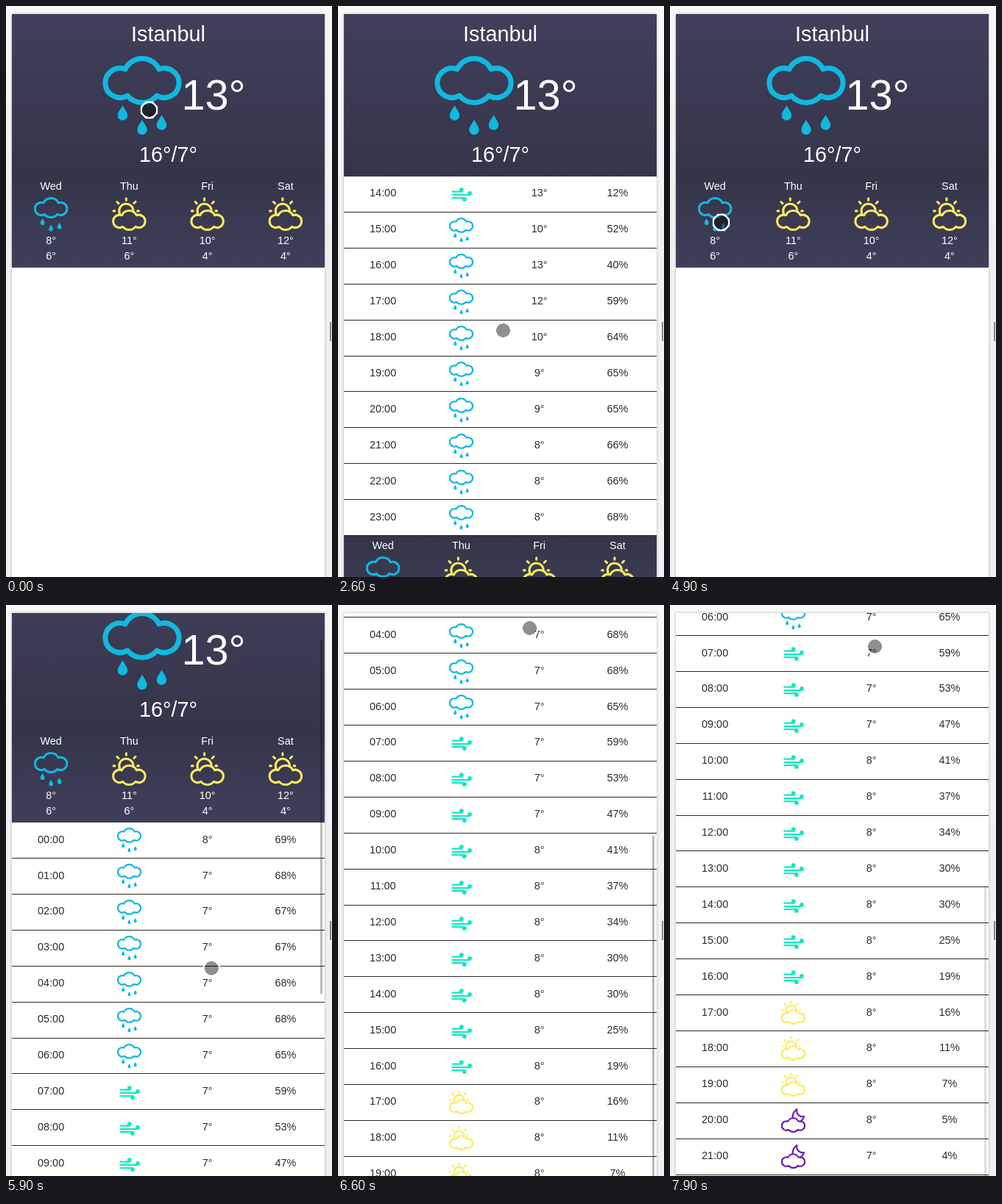
These frames come from a looping animation (443 by 777 pixels, 8 s). An HTML page with a canvas:

```html
<!DOCTYPE html>
<html lang="en">
<head>
<meta charset="utf-8">
<title>Weather forecast</title>
<style>
html, body { margin: 0; width: 443px; height: 777px; overflow: hidden; background: #f2f2f2; }
canvas { display: block; }
</style>
</head>
<body>
<canvas id="stage" width="443" height="777"></canvas>
<script>
const ctx = document.getElementById('stage').getContext('2d');
const LOOP = 8000, TICK = 100;
const LEFT = 8, TOP = 11, WIDTH = 425, HEADER = 232, DAYS = 124, ROW = 48.9;
const CENTER = LEFT + WIDTH / 2;
const column = i => LEFT + WIDTH * (i + 0.5) / 4;

// Icons live in a 106 unit square.
const ICON = 106;
const CLOUD = 'M30 18A25.5 25.5 0 0 1 76 18A20 20 0 1 1 73 54A25.8 25.8 0 0 1 33 54A20 20 0 1 1 30 18Z';
const path = d => new Path2D(d);
const lowCloud = new Path2D();
lowCloud.addPath(path(CLOUD), new DOMMatrix().translate(0, 39));
const drop = (x, y) => `M${x} ${y}c2 5 6.7 9 6.7 14a6.7 6.7 0 0 1 -13.4 0c0 -5 4.7 -9 6.7 -14Z`;
const ball = (x, y) => `M${x - 9.5} ${y}a9.5 9.5 0 1 0 19 0a9.5 9.5 0 1 0 -19 0Z`;

const icons = {
  rain: {
    color: '#10b9e0', lines: [path(CLOUD)],
    solid: path(drop(26.5, 67) + drop(53, 86.5) + drop(79.5, 80))
  },
  sun: {
    color: '#fbea60',
    lines: [lowCloud, path('M23.5 52A22 22 0 1 1 65.5 46M43.8 4V10M4 43.5H8M79 43.5H83M15 15L20 20M73 14.5L68 19.5')]
  },
  wind: {
    color: '#17e8c2', lines: [path('M14 44H56M14 58H90M14 71H68')],
    solid: path(ball(54, 36) + ball(90, 51) + ball(67, 77))
  },
  night: {
    color: '#6b20b8',
    lines: [lowCloud, path('M50 41C50 22 58 10 69 4C65 24 78 38 100 36C97 46 92 52 85 57')]
  }
};

// Forecast content: one entry of rain chance per hour.
const forecast = (first, chances, sky, temp) => chances.map((chance, i) => {
  const h = first + i;
  return { icon: sky(h), cells: [String(h).padStart(2, '0') + ':00', '', temp(h) + '°', chance + '%'] };
});
const today = forecast(14, [12, 52, 40, 59, 64, 65, 65, 66, 66, 68],
  h => h === 14 ? 'wind' : 'rain',
  h => [13, 10, 13, 12, 10][h - 14] || (h < 21 ? 9 : 8));
const wednesday = forecast(0,
  [69, 68, 67, 67, 68, 68, 65, 59, 53, 47, 41, 37, 34, 30, 30, 25, 19, 16, 11, 7, 5, 4, 3, 3],
  h => h < 7 ? 'rain' : h < 17 ? 'wind' : h < 20 ? 'sun' : 'night',
  h => h === 0 || (h > 9 && h < 21) ? 8 : 7);
const days = [['Wed', 'rain', 8, 6], ['Thu', 'sun', 11, 6], ['Fri', 'sun', 10, 4], ['Sat', 'sun', 12, 4]];

// Pointer strokes: first tick, last tick, x, y, page scroll.
const strokes = [
  [6, 8, 204, 143], [10, 10, 204, 137], [25, 26, 224, 441], [27, 30, 245, 155],
  [40, 43, 100, 331], [44, 49, 69, 294], [53, 57, 280, 540],
  [59, 62, 275, 355, 239.35], [63, 66, 260, 31, 534.3],
  [70, 74, 270, 75, 656.25], [76, 79, 278, 56, 656.25]
];

function pointerAt(tick) {
  let state = [194, 141, 0];
  for (const [first, last, x, y, scroll = 0] of strokes) {
    if (tick < first) break;
    const p = Math.min(1, (tick - first + 1) / (last - first + 1));
    state = [x, y, scroll].map((goal, i) => state[i] + (goal - state[i]) * p);
  }
  return state;
}

function text(str, x, y, color, size = 14.4, align = 'center') {
  ctx.font = `${size}px "Liberation Sans", Arial, sans-serif`;
  ctx.textAlign = align;
  ctx.fillStyle = color;
  ctx.fillText(str, x, Math.round(y));
}

function icon(name, x, y, size) {
  const { color, lines, solid } = icons[name];
  ctx.save();
  ctx.translate(x, y);
  ctx.scale(size / ICON, size / ICON);
  ctx.strokeStyle = ctx.fillStyle = color;
  ctx.lineWidth = 7;
  ctx.lineCap = ctx.lineJoin = 'round';
  lines.forEach(line => ctx.stroke(line));
  if (solid) ctx.fill(solid);
  ctx.restore();
}

function verticalFade(y, height, from, to) {
  const shade = ctx.createLinearGradient(0, y, 0, y + height);
  shade.addColorStop(0, from);
  shade.addColorStop(1, to);
  return shade;
}

function panel(y, height, from, to) {
  ctx.fillStyle = verticalFade(y, height, from, to);
  ctx.fillRect(LEFT, y, WIDTH, height);
}

function drawHeader(y) {
  panel(y + TOP, HEADER - TOP, '#413f5c', '#353549');
  text('Istanbul', CENTER, y + 48, '#fff', 28.8);
  icon('rain', 132, y + 68, 106);
  text('13°', 238.5, y + 141, '#fff', 57.6, 'left');
  text('16°/7°', CENTER, y + 212, '#fff', 28.8);
}

function drawDays(y) {
  panel(y, DAYS, '#353549', '#403f5b');
  days.forEach(([name, sky, high, low], i) => {
    const x = column(i);
    text(name, x, y + 18, '#fff');
    icon(sky, x - 23, y + 28, 46);
    text(high + '°', x, y + 92, '#fff');
    text(low + '°', x, y + 113, '#fff');
  });
}

function drawHours(list, top) {
  list.forEach((hour, i) => {
    const y = top + i * ROW;
    hour.cells.forEach((str, c) => text(str, column(c), y + 27.45, '#2b2b2b'));
    icon(hour.icon, 151, Math.round(y + 7.3), 33);
    ctx.fillStyle = '#2a2a2a';
    ctx.fillRect(LEFT, Math.round(y + ROW - 1), WIDTH, 1);
  });
}

function drawPointer(x, y) {
  ctx.beginPath();
  ctx.arc(x, y, 9.7, 0, 7);
  ctx.fillStyle = 'rgba(0,0,0,.44)';
  ctx.fill();
  for (let i = 0; i < 8; i++) {
    const a = (i + 0.5) * Math.PI / 4;
    const px = x + 12.6 * Math.cos(a), py = y + 12.6 * Math.sin(a);
    i ? ctx.lineTo(px, py) : ctx.moveTo(px, py);
  }
  ctx.closePath();
  ctx.fillStyle = '#fff';
  ctx.fill('evenodd');
}

function drawBackdrop() {
  ctx.fillStyle = verticalFade(0, 300, '#f8f9f6', '#f1f1f1');
  ctx.fillRect(0, 0, 443, 777);
  ctx.save();
  ctx.shadowColor = 'rgba(0,0,0,.3)';
  ctx.shadowBlur = 3;
  ctx.fillStyle = '#fffffe';
  ctx.fillRect(LEFT, TOP, WIDTH, 800);
  ctx.restore();
  ctx.fillStyle = '#858585';
  ctx.fillRect(440, 430, 2, 26);
}

function drawScrollbar(scroll, fade) {
  ctx.fillStyle = `rgba(0,0,0,${0.27 * fade})`;
  ctx.fillRect(427, Math.round(13.5 + scroll * 0.563), 3, 482);
}

function draw(now) {
  const tick = Math.floor(now % LOOP / TICK);
  const [x, y, scroll] = pointerAt(tick);
  const showToday = tick >= 13 && tick < 33;
  const listTop = HEADER - scroll;
  const daysTop = Math.round(listTop + (showToday ? today.length * ROW : 0));

  drawBackdrop();
  ctx.save();
  ctx.beginPath();
  ctx.rect(LEFT, TOP, WIDTH, 800);
  ctx.clip();
  drawHeader(-Math.round(scroll));
  if (showToday) drawHours(today, listTop);
  drawDays(daysTop);
  if (tick >= 51) drawHours(wednesday, listTop + DAYS);
  if (tick >= 59) drawScrollbar(scroll, Math.min(1, 1 - (tick - 75) * 0.13));
  ctx.restore();
  drawPointer(x + 0.5, y + 0.5);
}

const start = performance.now();
(function frame() {
  draw(performance.now() - start);
  requestAnimationFrame(frame);
})();
</script>
</body>
</html>
```
